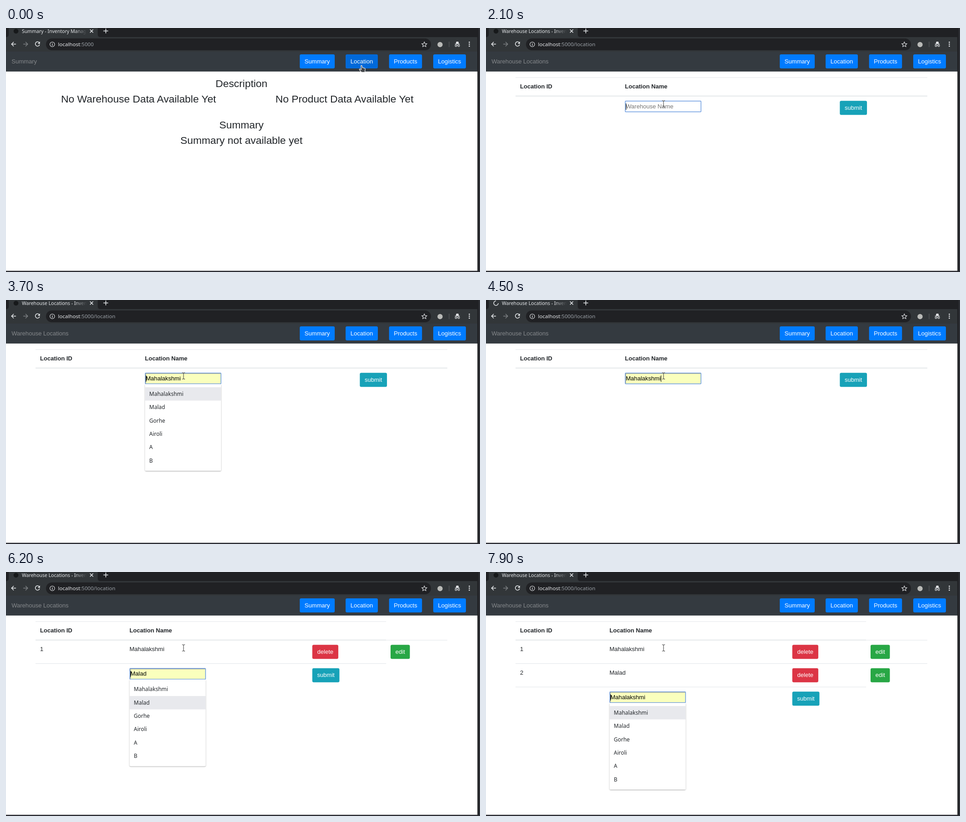
Recreate the animation shown at these times as an HTML page. Size 1044 px wide and 537 px high, loop 8000 ms.

```html
<!DOCTYPE html>
<html lang="en">
<head>
<meta charset="utf-8">
<title>Inventory</title>
<style>
html, body { margin: 0; width: 100%; height: 100%; overflow: hidden; background: #fff; }
svg { display: block; width: 100%; height: 100%; }
text { font: 13.05px "Liberation Sans", Arial, sans-serif; fill: #212529; }
.h { font-size: 22.84px; text-anchor: middle; }
.b { font-weight: bold; }
.w { fill: #fff; text-anchor: middle; }
.brand { fill: #85888b; }
.hint { fill: #757575; }
.val { fill: #000; }
.ui { font: 11.6px "Noto Sans", sans-serif; fill: #e8eaed; }
.tab { font: 10.55px "Noto Sans", sans-serif; fill: #e8eaed; }
.item { font: 11.96px "Noto Sans", sans-serif; }
.dim { fill: #9aa0a6; }
.ico { fill: none; stroke: #e8eaed; stroke-width: 1.5; }
</style>
</head>
<body>
<svg viewBox="0 0 1044 537" preserveAspectRatio="none">
  <defs>
    <linearGradient id="fade">
      <stop offset="0" stop-color="#323639" stop-opacity="0"/>
      <stop offset="1" stop-color="#323639"/>
    </linearGradient>
    <filter id="shadow" x="-10%" y="-10%" width="120%" height="120%">
      <feDropShadow dx="0" dy="1" stdDeviation="1.3" flood-opacity=".4"/>
    </filter>
  </defs>
  <g id="view"></g>
</svg>
<script>
const LOOP = 8000;
const PLACES = ['Mahalakshmi', 'Malad', 'Gorhe', 'Airoli', 'A', 'B'];
const NAV = [['Summary', 647, 77], ['Location', 748, 71], ['Products', 843.7, 72.6], ['Logistics', 941, 72]];
const ROW = 51.5;
const view = document.getElementById('view');

const rect = (x, y, w, h, fill, more = '') =>
  `<rect x="${x}" y="${y}" width="${w}" height="${h}" fill="${fill}" ${more}/>`;
const text = (x, y, s, cls = '') => `<text x="${x}" y="${y}" class="${cls}">${s}</text>`;
const path = (d, more = 'class="ico"') => `<path d="${d}" ${more}/>`;
const rule = (x1, x2, y, h = .9) => rect(x1, y, x2 - x1, h, '#dee2e6');
const button = (s, x, y, w, fill) =>
  rect(x, y, w, 31, fill, 'rx="3.3"') + text(x + w / 2, y + 19.6, s, 'w');
const within = (t, ...spans) => spans.some(([a, b]) => t >= a && t < b);

// Everything visible follows from the time
function stateAt(t) {
  const s = {
    home: t < 700,
    title: t < 800 ? 'Summary - Inventory Manag' : 'Warehouse Locations - Inven',
    rows: t < 4700 ? 0 : t < 6900 ? 1 : 2,
    open: within(t, [2400, 4200], [5600, 6500], [7700, LOOP]),
    pick: -1,
    done: within(t, [4200, 4700], [6500, 6900]),
    caret: !within(t, [1300, 1800], [2900, 3200], [3900, 4200], [5400, 5600], [7500, 7700]),
    spin: within(t, [600, 800], [4300, 4700], [6600, 6900])
  };
  if (within(t, [3700, 4700], [5800, 6200], [7800, LOOP])) s.pick = 0;
  if (within(t, [6200, 6900])) s.pick = 1;
  return s;
}

function browser(t, s) {
  const turn = Math.min(t, t < 4700 ? 4500 : 6700) * .9;
  return rect(0, 0, 1044, 537, '#202124') +
    path('M0 20Q6 20 6 14V0H202V14Q202 20 208 20H1038V52H0Z', 'fill="#323639"') +
    (s.spin
      ? path('M22 2A5 5 0 1 1 17 7', `class="ico" transform="rotate(${turn} 22 7)"`)
      : '<circle cx="22" cy="7" r="5.3" fill="#17191b"/>') +
    text(35, 10.7, s.title, 'tab') +
    rect(152, 0, 26, 18, 'url(#fade)') + rect(178, 0, 7, 18, '#323639') +
    path('M185 3.2l7 7M192 3.2l-7 7M214.5 6.5h10.6M219.8 1.2v10.6') +
    path('M22 35.5H12.5M17 30.7l-4.8 4.8 4.8 4.8') +
    path('M38 35.5h9.5M43 30.7l4.8 4.8-4.8 4.8', 'class="ico" style="stroke:#7d8083"') +
    path('M73 32A4.8 4.8 0 1 0 74 36.5') + path('M74.8 29.8v5h-5z', 'fill="#e8eaed"') +
    rect(88, 23, 848, 26, '#202124', 'rx="13"') +
    '<circle cx="102" cy="36" r="5.2" class="ico" style="stroke-width:1.1"/>' +
    rect(101.4, 35, 1.3, 4, '#e8eaed') + rect(101.4, 32.8, 1.3, 1.3, '#e8eaed') +
    `<text x="114.5" y="40" class="ui">localhost<tspan class="dim">:5000${t < 600 ? '' : '/location'}</tspan></text>` +
    path('M921.4 30.6l1.6 3.7 4 .3-3 2.7.9 3.9-3.5-2.1-3.5 2.1.9-3.9-3-2.7 4-.3z', 'class="ico" style="stroke-width:1.1"') +
    '<circle cx="956" cy="36.5" r="5.7" fill="#b9bab7"/>' +
    rect(975.5, 30, 1, 12, '#606367') +
    path('M988.5 35.3h11M991.3 34l1-3.5h3.6l1 3.5zM992.8 38.8h2.6', 'fill="#e8eaed" stroke="#e8eaed" stroke-width="1.1"') +
    '<circle cx="991" cy="39" r="1.9" class="ico" style="stroke-width:1.1"/><circle cx="997.2" cy="39" r="1.9" class="ico" style="stroke-width:1.1"/>' +
    [31.3, 35.6, 39.9].map(y => `<circle cx="1020.5" cy="${y}" r="1.4" fill="#e8eaed"/>`).join('') +
    rect(0, 52, 1038, 44, '#343a40') + rect(0, 95.8, 1038.3, 438.6, '#fff') +
    rect(1041, 0, 3, 537, '#2d2f34') + rect(0, 535, 1044, 2, '#2b2c33') +
    text(12.2, 77.6, s.home ? 'Summary' : 'Warehouse Locations', 'brand') +
    NAV.map(([name, x, w], i) =>
      button(name, x, 58, w, i === 1 && s.home ? '#0069d9' : '#007bff')).join('');
}

function home() {
  return text(518.6, 130, 'Description', 'h') +
    text(292, 163.8, 'No Warehouse Data Available Yet', 'h') +
    text(745.5, 163.8, 'No Product Data Available Yet', 'h') +
    text(518.6, 221, 'Summary', 'h') +
    text(518.6, 254.5, 'Summary not available yet', 'h');
}

function field(x, y, s) {
  const filled = s.pick >= 0, value = PLACES[s.pick];
  const end = s.done ? value.length * 7.05 - (s.pick ? 0 : .5) : 0;
  return rect(x + .7, y + .7, 166.8, 23.9, filled ? '#faffbd' : '#fff', 'rx="1" stroke="#6a9ae0" stroke-width="1.5"') +
    (filled ? path(`M${x + 1.8} ${y + 23.5}v-21.6h164.8`, 'fill="none" stroke="#8b929c" stroke-width="1"') : '') +
    text(x + 2, y + 16.7, value || 'Warehouse Name', filled ? 'val' : 'hint') +
    (s.caret ? rect(x + 2 + end, y + 6, 1, 14, '#000') : '');
}

function menu(x, y, s) {
  return rect(x + .3, y, 167.4, 190.8, '#fff', 'rx="2" filter="url(#shadow)"') +
    PLACES.map((name, i) => {
      const top = y + 7 + i * 29.45;
      return (i === s.pick ? rect(x + .3, top, 167.4, 29.4, '#e8e9ed') : '') +
        text(x + 9.6, top + 18.6, name, 'item');
    }).join('');
}

function locations(s) {
  const n = s.rows, x = n ? 272 : 306, right = n ? 837.3 : 972, y = 160 + n * ROW;
  let out = rule(65, right, 108.6) + rule(65, right, 148.9, 1.6) +
    text(75, 133.2, 'Location ID', 'b') + text(x, 133.2, 'Location Name', 'b');
  for (let i = 0; i < n; i++) {
    const top = i * ROW;
    out += rule(i ? 65 : right, 972, 149.6 + top) +
      text(75, 174.2 + top, i + 1) + text(x, 174.2 + top, PLACES[i]) +
      button('delete', 674.6, 160.2 + top, 57.3, '#dc3545') +
      button('edit', 847, 160.2 + top, 42.5, '#28a745');
  }
  if (n) out += rule(65, right, 149.6 + n * ROW);
  return out + button('submit', n ? 674.6 : 779.3, y + .2, 59.8, '#17a2b8') +
    field(x, y, s) + (s.open ? menu(x, y + 25, s) : '');
}

function pointer(t) {
  const u = Math.min(1, Math.max(0, (t - 1100) / 1000)), k = u * u * (3 - 2 * u), r = 1 - k;
  const x = 783 * r * r + 2 * 560 * r * k + 391 * k * k;
  const y = 82 * r * r + 2 * 230 * r * k + 167 * k * k;
  const at = `transform="translate(${x} ${y})"`;
  if (x < 474 && y < 185)
    return path('M-3.2-7.2Q0-7.2 0-5.5Q0-7.2 3.2-7.2M0-6V6M-3.2 7.2Q0 7.2 0 5.5Q0 7.2 3.2 7.2',
      `${at} fill="none" stroke="#555" stroke-width="1.2"`);
  const shape = y < 89
    ? 'M-1.3.8Q0-.3 1 .9L2 5.2 6.6 6.3Q8.6 7 8.2 9L7.3 15.3H-.2L-4.7 9.6Q-5 7.6-2.8 8.2L-.5 9.5z'
    : 'M0 0V14.5L3.5 11.3 6 16.5 8.4 15.4 6 10.4H10.5z';
  return path(shape, `${at} fill="#44474b" stroke="#fff" stroke-width="1.1" stroke-linejoin="round"`);
}

let last = -1;
function frame(now) {
  const t = Math.floor(now % LOOP / 100) * 100;
  if (t !== last) {
    const s = stateAt(t);
    view.innerHTML = browser(t, s) + (s.home ? home() : locations(s)) + pointer(t);
    last = t;
  }
  requestAnimationFrame(frame);
}
frame(performance.now());
</script>
</body>
</html>
```
